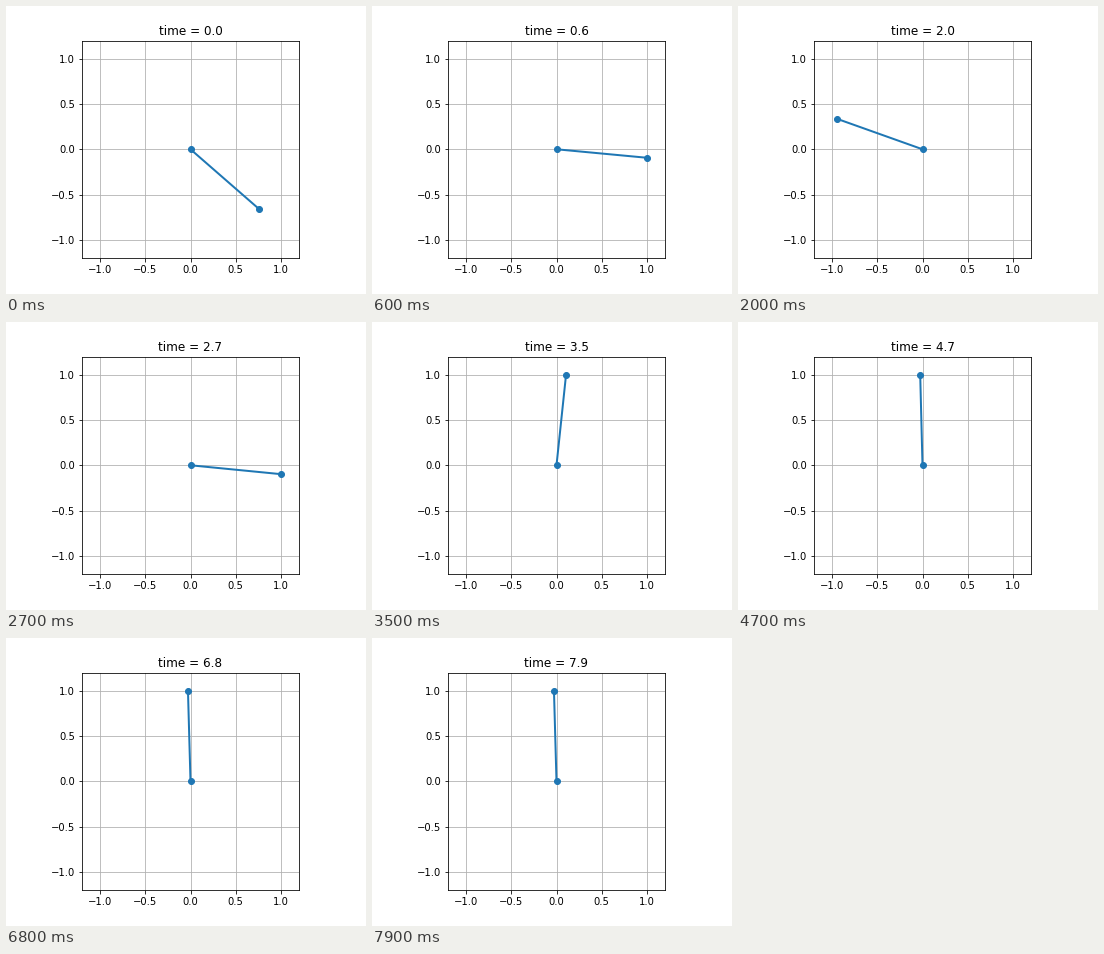
Animation of 360 by 288 pixels, one loop 8000 ms. Source, as a matplotlib script:

```python
import numpy as np
import matplotlib.pyplot as plt
from matplotlib.animation import FuncAnimation

DT = 0.1
FRAMES = 80

# Swing-up as (time, angle from hanging down, angular velocity):
# start, right peak, bottom, left peak, bottom, release
KEYS = [(0, 0.854, 3.02), (0.462, 1.602, 0), (1.0, -0.021, -5.35),
        (1.76, -2.22, 0), (2.435, 0, 6.1), (2.7, 1.473, 4.89)]
REST = np.pi + 0.028   # balanced slightly past upright
RATE = 3.26


def hermite(t, start, end):
    (t0, a0, v0), (t1, a1, v1) = start, end
    h = t1 - t0
    u = (t - t0) / h
    return (a0 * (1 + 2 * u) * (1 - u) ** 2 + a1 * u * u * (3 - 2 * u)
            + h * (v0 * u * (1 - u) ** 2 + v1 * u * u * (u - 1)))


def angle(t):
    for start, end in zip(KEYS, KEYS[1:]):
        if t < end[0]:
            return hermite(t, start, end)
    # free pendulum creeping up to its balance point
    t_end, a_end, _ = KEYS[-1]
    gap = np.tan((REST - a_end) / 4) * np.exp(-RATE * (t - t_end))
    return REST - 4 * np.arctan(gap)


fig = plt.figure(figsize=(5, 4), dpi=72, facecolor="white")
fig.subplots_adjust(left=0.125, right=0.9, bottom=0.125, top=0.88)
ax = fig.add_subplot(111, aspect="equal", autoscale_on=False,
                     xlim=(-1.2, 1.2), ylim=(-1.2, 1.2))
ax.grid()
rod, = ax.plot([], [], "o-", lw=2)
title = ax.set_title("")


def update(i):
    t = i * DT
    a = angle(t)
    rod.set_data([0, np.sin(a)], [0, -np.cos(a)])
    title.set_text(f"time = {t:.1f}")
    return rod, title


anim = FuncAnimation(fig, update, frames=FRAMES, interval=1000 * DT,
                     repeat=True, repeat_delay=0, blit=False)
plt.show()
```
